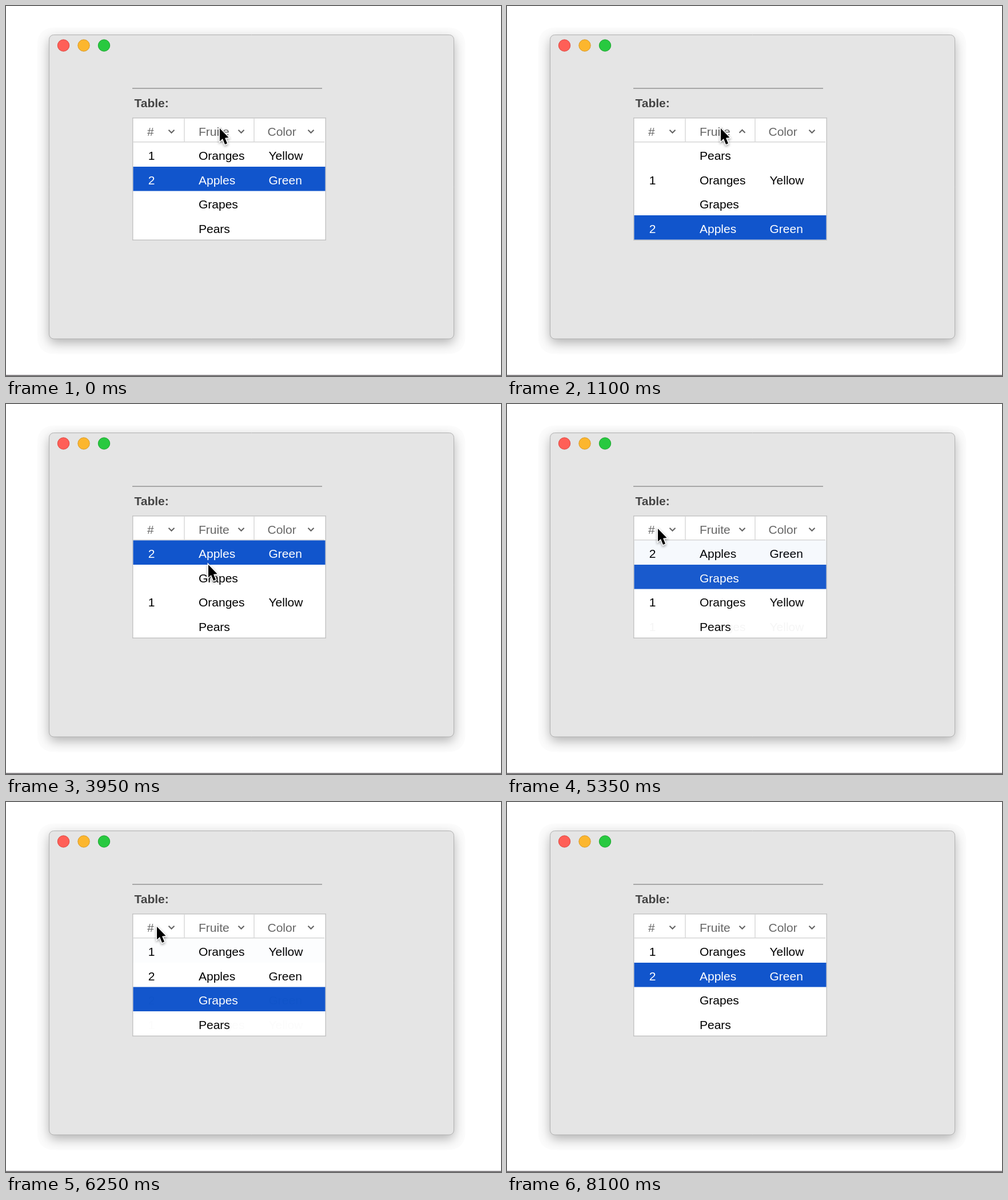
Animation, 866 px wide and 647 px high, one loop 8.45 s. Source, as an HTML page with a canvas:

```html
<!DOCTYPE html>
<html lang="en">
<head>
<meta charset="utf-8">
<title>Sortable table</title>
<style>
html, body { margin: 0; width: 100%; height: 100%; overflow: hidden; background: #fff; }
canvas { display: block; }
</style>
</head>
<body>
<canvas id="stage" width="866" height="647"></canvas>
<script>
const W = 866, H = 647, LOOP = 8450, STEP = 50;
const ctx = document.getElementById('stage').getContext('2d');
const FONT = '21px "Liberation Sans", Arial, sans-serif';
const BLUE = '#1155cc', GREY = '#666';

const FRUITS = {
  Oranges: ['1', 'Yellow'],
  Apples: ['2', 'Green'],
  Grapes: ['', ''],
  Pears: ['', '']
};
const HEADERS = [['#', 247, 289.5], ['Fruite', 337, 411.5], ['Color', 457.5, 533.5]];

// Each state fades in from its start time; "up" is the column with a raised chevron.
const STATES = [
  { at: 0, dur: 0, rows: 'Oranges Apples Grapes Pears', sel: 'Apples', up: -1 },
  { at: 770, dur: 300, rows: 'Pears Oranges Grapes Apples', sel: 'Apples', up: 1 },
  { at: 2170, dur: 300, rows: 'Apples Grapes Oranges Pears', sel: 'Apples', up: -1 },
  { at: 4420, dur: 70, rows: 'Apples Grapes Oranges Pears', sel: 'Grapes', up: -1 },
  { at: 5335, dur: 300, rows: 'Grapes Pears Apples Oranges', sel: 'Grapes', up: 0 },
  { at: 5995, dur: 300, rows: 'Oranges Apples Grapes Pears', sel: 'Grapes', up: -1 },
  { at: 7320, dur: 110, rows: 'Oranges Apples Grapes Pears', sel: 'Apples', up: -1 }
];

const linear = u => u;
const smooth = u => u * u * (3 - 2 * u);
const easeOut = u => u * (2 - u);

// Pointer tip: time, x, y, easing towards this point
const PATH = [
  [0, 374, 214, linear],
  [3250, 374, 214, linear],
  [3950, 354, 281, linear],
  [4150, 356, 304, easeOut],
  [4600, 356, 304, linear],
  [5100, 264, 218, smooth],
  [6250, 264, 218, linear],
  [7100, 341, 306, smooth],
  [7850, 341, 306, linear],
  [8050, 822, 5, smooth],
  [8100, 1100, -200, linear],
  [LOOP, 1100, -200, linear]
];
const ARROW = [[0, 0], [0, 22.5], [5, 18], [9, 28], [13, 26.3], [9, 16.7], [15.5, 16]];

// CSS "ease" curve
function ease(x) {
  if (x <= 0) return 0;
  if (x >= 1) return 1;
  let lo = 0, hi = 1, s = 0.5;
  for (let i = 0; i < 20; i++) {
    s = (lo + hi) / 2;
    const bx = 0.75 * s * (1 - s) + s * s * s;
    if (bx < x) lo = s; else hi = s;
  }
  return 0.3 * s * (1 - s) * (1 - s) + 3 * s * s * (1 - s) + s * s * s;
}

function newLayer(paint) {
  const layer = document.createElement('canvas');
  layer.width = W;
  layer.height = H;
  paint(layer.getContext('2d'));
  return layer;
}

function trace(c, points) {
  c.beginPath();
  points.forEach(([x, y], i) => i ? c.lineTo(x, y) : c.moveTo(x, y));
}

function box(c, x, y, w, h, r) {
  c.beginPath();
  c.roundRect(x, y, w, h, r);
}

function rect(c, color, x, y, w, h) {
  c.fillStyle = color;
  c.fillRect(x, y, w, h);
}

function write(c, text, x, y, color) {
  c.fillStyle = color;
  c.fillText(text, x, y);
}

function paintWindow(c) {
  rect(c, '#fff', 0, 0, W, H);
  box(c, 55, 38, 748, 570, 26);
  c.fillStyle = '#fcfcfc';
  c.fill();

  c.save();
  c.shadowColor = 'rgba(0,0,0,.3)';
  c.shadowBlur = 20;
  c.shadowOffsetY = 7;
  box(c, 75.5, 50.5, 708, 531.5, 8);
  c.fillStyle = '#e5e5e5';
  c.fill();
  c.restore();
  c.strokeStyle = '#b0b0b0';
  c.stroke();

  [['#ff5f57', '#dd4640'], ['#fcb62e', '#d99a27'], ['#28c940', '#1da530']].forEach(([fill, edge], i) => {
    c.beginPath();
    c.arc(100.5 + i * 35.5, 69, 10.2, 0, 7);
    c.fillStyle = fill;
    c.fill();
    c.strokeStyle = edge;
    c.stroke();
  });

  rect(c, '#989898', 221, 143.2, 332, 1.6);
  c.font = 'bold ' + FONT;
  write(c, 'Table:', 224.5, 177, '#444');
  rect(c, '#858285', 0, 645, W, 2);
}

function paintChevron(c, x, up) {
  const d = up ? -2.5 : 2.5;
  trace(c, [[x - 5, 219.2 - d], [x, 219.2 + d], [x + 5, 219.2 - d]]);
  c.strokeStyle = GREY;
  c.lineWidth = 2.2;
  c.stroke();
}

function paintTable(c, state) {
  rect(c, '#c4c4c4', 221, 195, 339, 215);
  rect(c, '#fff', 222.5, 196.5, 336, 212);
  rect(c, '#d6d6d6', 222.5, 237, 334.5, 1.5);
  rect(c, '#d6d6d6', 311.3, 196.5, 1.4, 41);
  rect(c, '#d6d6d6', 433.3, 196.5, 1.4, 41);

  c.font = FONT;
  HEADERS.forEach(([label, x, chevron], i) => {
    write(c, label, x, 226.5, GREY);
    paintChevron(c, chevron, i === state.up);
  });

  state.rows.split(' ').forEach((name, i) => {
    const y = 238.5 + i * 42.5, picked = name === state.sel;
    const [num, hue] = FRUITS[name], color = picked ? '#fff' : '#000';
    if (picked) rect(c, BLUE, 222.5, y, 336, 42.5);
    write(c, num, 248.8, y + 30.5, color);
    write(c, name, 337, y + 30.5, color);
    write(c, hue, 459.5, y + 30.5, color);
  });
}

function drawPointer(t) {
  const i = PATH.findIndex(p => p[0] > t);
  const [t0, x0, y0] = PATH[i - 1], [t1, x1, y1, curve] = PATH[i];
  const u = curve((t - t0) / (t1 - t0));
  ctx.save();
  ctx.translate(x0 + (x1 - x0) * u, y0 + (y1 - y0) * u);
  trace(ctx, ARROW);
  ctx.closePath();
  ctx.lineWidth = 3;
  ctx.strokeStyle = '#fff';
  ctx.shadowColor = 'rgba(0,0,0,.4)';
  ctx.shadowBlur = 4;
  ctx.shadowOffsetY = 2;
  ctx.stroke();
  ctx.shadowColor = 'transparent';
  ctx.fillStyle = '#000';
  ctx.fill();
  ctx.restore();
}

const backdrop = newLayer(paintWindow);
const tables = STATES.map(s => newLayer(c => paintTable(c, s)));

function draw(t) {
  ctx.drawImage(backdrop, 0, 0);
  let now = 0;
  while (now + 1 < STATES.length && STATES[now + 1].at <= t) now++;
  const { at, dur } = STATES[now];
  const shown = dur ? ease((t - at) / dur) : 1;
  if (shown < 1) ctx.drawImage(tables[now - 1], 0, 0);
  ctx.globalAlpha = shown;
  ctx.drawImage(tables[now], 0, 0);
  ctx.globalAlpha = 1;
  drawPointer(t);
}

const start = performance.now();
function tick() {
  const t = (performance.now() - start) % LOOP;
  draw(Math.floor(t / STEP) * STEP);
  requestAnimationFrame(tick);
}
tick();
</script>
</body>
</html>
```
